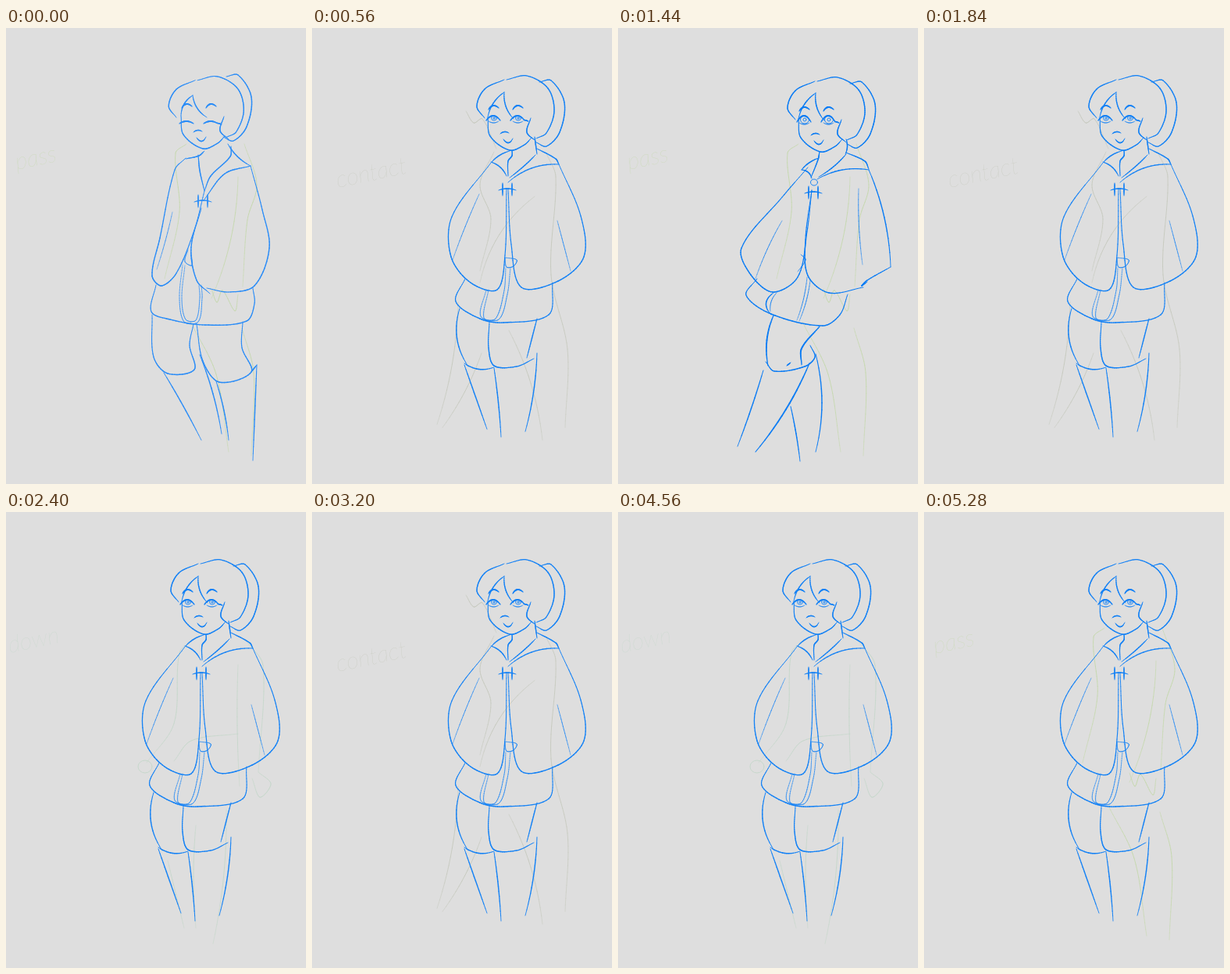
An HTML page with a canvas for the animation above (5.36 s loop, 384 by 582 pixels).

```html
<!DOCTYPE html>
<html lang="en">
<head>
<meta charset="utf-8">
<title>Walk sketch</title>
<style>
html, body { margin: 0; width: 100%; height: 100%; overflow: hidden; background: #dedede; }
canvas { display: block; width: 384px; height: 582px; }
</style>
</head>
<body>
<canvas id="stage"></canvas>
<script>
const W = 384, H = 582, STEP = 80, STEPS = 67;
const canvas = document.getElementById("stage");
const dpr = window.devicePixelRatio || 1;
canvas.width = W * dpr;
canvas.height = H * dpr;
const g = canvas.getContext("2d");
g.scale(dpr, dpr);
g.lineCap = "round";

let weight = 1.4;
const mix = (a, b, t) => a + (b - a) * t;

// A pen stroke along at(t), thinner towards both ends
function stroke(at, pieces) {
  let [x, y] = at(0);
  for (let i = 1; i <= pieces; i++) {
    const t = i / pieces;
    g.lineWidth = weight * (0.6 + 0.4 * Math.sin(Math.PI * t));
    g.beginPath();
    g.moveTo(x, y);
    [x, y] = at(t);
    g.lineTo(x, y);
    g.stroke();
  }
}

// Arc from one point to another; a positive bulge goes up for rightward strokes
function bow(x1, y1, x2, y2, bulge = 0) {
  const dx = x2 - x1, dy = y2 - y1, len = Math.hypot(dx, dy);
  stroke(t => {
    const b = 4 * t * (1 - t) * bulge / len;
    return [x1 + dx * t + dy * b, y1 + dy * t - dx * b];
  }, 14);
}

// Smooth curve through x,y pairs, with tangents weighted by chord length
function curve(...xy) {
  const n = xy.length / 2 - 1;
  const p = i => { i = Math.min(n, Math.max(0, i)); return [xy[2 * i], xy[2 * i + 1]]; };
  const gap = (a, b) => Math.hypot(b[0] - a[0], b[1] - a[1]);
  const slope = (i, k) => {
    const a = p(i - 1), b = p(i), c = p(i + 1);
    return (c[k] - a[k]) / (gap(a, b) + gap(b, c));
  };
  stroke(t => {
    const i = Math.min(n - 1, Math.floor(t * n)), u = t * n - i, v = 1 - u;
    const a = p(i), b = p(i + 1), d = gap(a, b);
    return [0, 1].map(k =>
      a[k] * v * v * (1 + 2 * u) + b[k] * u * u * (1 + 2 * v) +
      d * u * v * (slope(i, k) * v - slope(i + 1, k) * u));
  }, n * 12);
}

function ring(x, y, rx, ry) {
  g.lineWidth = 0.9;
  g.beginPath();
  g.ellipse(x, y, rx, ry, 0, 0, 2 * Math.PI);
  g.stroke();
}

function place(x, y, size, part) {
  g.save();
  g.translate(x, y);
  g.scale(size, size);
  part();
  g.restore();
}

function inked(w, part) {
  const before = weight;
  weight = w;
  part();
  weight = before;
}

// Head parts are measured from the chin
function hair() {
  curve(-7, -90, -32, -78, -42, -56, -32, -41);
  curve(-4, -90, 22, -95, 49, -79, 57, -50, 47, -22, 34, -15);
}
function tail() {
  curve(38, -87, 53, -89, 70, -61, 64, -23, 47, -5, 34, -10);
}
function face(tipX, tipY, open) {
  curve(-28, -42, -25, -18, 0, 0, 19, -7, 28, -16);
  bow(tipX, tipY, -28, -42, -4);
  bow(tipX, tipY, 5, -40, -4);
  curve(27, -41, 22, -23, 33, -12);
  const eyeY = open ? -38 : -32;
  for (const x of [-21, 10]) {
    inked(2, () => {
      bow(x - 9, eyeY, x + 9, eyeY, open + 3);
      bow(x - 6, -52, x + 7, -54, 4);
    });
    if (open) {
      ring(x + 1, -41, open + 0.5, open);
      ring(x + 1, -41, open / 2.5, open / 2.5);
      inked(0.8, () => bow(x - 6, -37, x + 7, -37, -2));
    }
  }
  bow(24, eyeY + 1, 18, eyeY - 1);
  bow(-12, -21, -1, -22, 2);
  bow(-8, -14, 4, -15, -5);
}

function clasp(x, y) {
  bow(x - 11, y + 1, x + 11, y + 1, 2);
  for (const side of [-6, 6]) bow(x + side, y - 8, x + side, y + 8);
}

function shy() {
  place(249, 154, 0.97, hair);
  place(244, 149, 1, tail);
  place(252, 154, 1, () => face(-13, -68, 0));
  // coat
  curve(230, 167, 247, 163, 254, 157);
  curve(246, 162, 248, 182, 254, 208);
  bow(284, 148, 313, 176, -3);
  curve(288, 151, 287, 164, 262, 189, 254, 208);
  curve(313, 176, 280, 186, 253, 220);
  clasp(252, 221);
  curve(230, 166, 216, 181, 197, 268, 187, 316, 199, 329, 218, 313, 241, 258, 254, 208);
  curve(313, 176, 328, 232, 337, 281, 318, 329, 285, 337, 257, 332);
  curve(250, 230, 237, 280, 244, 322, 261, 339);
  // shorts
  curve(192, 328, 186, 362, 210, 372, 255, 379, 308, 374, 318, 352, 316, 332);
  inked(0.8, () => {
    bow(213, 235, 193, 308, 1);
    curve(233, 283, 229, 298, 238, 303, 237, 288);
    curve(226, 302, 222, 345, 228, 375, 246, 375, 251, 345, 250, 328);
    curve(229, 303, 225, 345, 230, 372, 243, 373, 248, 345, 247, 328);
  });
  // legs
  curve(187, 366, 189, 420, 207, 441, 241, 436, 235, 405, 240, 378);
  curve(244, 378, 252, 425, 273, 452, 314, 439, 302, 408, 303, 375);
  bow(202, 440, 250, 526, 1);
  bow(248, 417, 276, 518, 3);
  bow(269, 451, 285, 526, 2);
  bow(314, 439, 321, 430);
  bow(321, 430, 316, 552);
}

function wide() {
  place(259, 158, 1, () => { hair(); tail(); face(-6, -75, 5); });
  // cape
  curve(258, 158, 256, 168, 247, 191);
  bow(235, 181, 257, 166, 2);
  bow(235, 181, 248, 192, 3);
  bow(292, 142, 291, 161, 2);
  curve(292, 159, 316, 170, 321, 180);
  bow(321, 181, 255, 193, -6);
  bow(292, 161, 257, 190, 2);
  ring(251, 197, 4.5, 4);
  clasp(250, 210);
  curve(243, 178, 210, 216, 158, 281, 170, 315, 198, 337, 230, 318, 242, 260, 248, 207);
  bow(321, 181, 349, 305, 6);
  curve(349, 305, 319, 322, 312, 329, 319, 324);
  curve(314, 331, 270, 338, 243, 316, 240, 270, 248, 207);
  // shorts
  curve(178, 320, 164, 341, 196, 365, 262, 380, 284, 366, 294, 340);
  bow(199, 338, 196, 366, -8);
  inked(0.8, () => {
    bow(210, 246, 176, 320, -2);
    bow(308, 205, 313, 302, -2);
    bow(203, 338, 195, 362, -3);
    bow(242, 318, 229, 373, 2);
    bow(246, 322, 232, 374, 2);
    curve(234, 289, 240, 296, 230, 311);
  });
  // legs
  bow(186, 437, 153, 534, 1);
  bow(221, 483, 233, 553, 1);
  bow(253, 416, 253, 541, 8);
  curve(189, 426, 200, 438, 239, 432, 252, 420, 246, 405);
  bow(216, 431, 221, 427);
  inked(1.9, () => {
    bow(199, 367, 192, 431, -5);
    curve(258, 381, 235, 409, 235, 430);
    bow(245, 428, 176, 541, 5);
  });
}

function calm() {
  place(253, 156, 1, () => { hair(); tail(); face(-7, -74, 3); });
  // coat
  curve(256, 156, 256, 163, 251, 170, 251, 189);
  bow(230, 171, 253, 157, 2);
  bow(229, 171, 249, 189, 3);
  bow(285, 139, 288, 161);
  curve(288, 154, 312, 167, 316, 174);
  bow(316, 174, 251, 197, -7);
  bow(286, 162, 253, 191, 1);
  clasp(250, 206);
  curve(229, 172, 179, 241, 178, 292, 203, 325, 237, 334, 247, 290, 249, 205);
  curve(316, 174, 344, 240, 348, 292, 315, 323, 268, 331, 255, 276, 251, 205);
  // shorts
  curve(196, 320, 184, 349, 215, 371, 245, 376, 303, 366, 308, 325);
  inked(0.8, () => {
    bow(214, 212, 180, 296, -1);
    bow(314, 246, 331, 310);
    curve(247, 293, 262, 296, 258, 304, 249, 305, 247, 293);
    curve(223, 334, 216, 368, 239, 372, 250, 340, 254, 306);
    curve(226, 334, 220, 370, 235, 371, 246, 335, 248, 306);
  });
  // legs
  bow(189, 358, 200, 432, -9);
  bow(195, 428, 233, 433, -5);
  curve(227, 376, 226, 408, 233, 431, 262, 432, 284, 422);
  bow(288, 371, 275, 421);
  bow(195, 430, 224, 512);
  bow(233, 434, 242, 522, 1);
  bow(288, 415, 273, 515, 3);
}

// Faint construction layer
function word(text, x, y) {
  g.save();
  g.translate(x, y);
  g.rotate(-0.21);
  g.font = "italic 100 30px Lato, 'Open Sans', sans-serif";
  g.fillText(text, 0, 0);
  g.restore();
}
function passing() {
  word("pass", 14, 181);
  curve(231, 148, 217, 160, 222, 235, 203, 320);
  curve(305, 148, 321, 200, 309, 245, 303, 330);
  bow(297, 190, 263, 345, 8);
  curve(263, 333, 270, 350, 277, 335, 293, 361, 297, 340);
  curve(236, 375, 269, 442, 285, 541);
  curve(302, 383, 317, 440, 314, 546);
}
function lowering() {
  word("down", 5, 180);
  curve(239, 163, 222, 180, 215, 270, 180, 320);
  curve(308, 165, 329, 196, 323, 332);
  ring(178, 325, 9, 8);
  curve(323, 332, 339, 347, 325, 364, 315, 340);
  bow(297, 195, 299, 350, -2);
  curve(215, 318, 237, 292, 297, 283);
  bow(207, 445, 228, 531);
  bow(282, 380, 265, 551, 5);
  bow(243, 400, 243, 531, -3);
}
function touching() {
  word("contact", 33, 204);
  curve(197, 106, 207, 121, 218, 116, 236, 154);
  curve(233, 158, 215, 200, 229, 244, 215, 310);
  curve(300, 160, 312, 190, 306, 315, 327, 410, 324, 510);
  bow(285, 215, 215, 325, -12);
  bow(187, 350, 160, 506, 6);
  bow(217, 415, 167, 510, 4);
  bow(252, 386, 295, 526, 7);
}

const poses = { A: ["#2a8cf7", shy], B: ["#0b7cf4", wide], C: ["#1582f5", calm] };
const roughs = { P: ["#c5d8ad", passing], D: ["#c5d7ca", lowering], K: ["#c6c9be", touching] };

// Drawings in order, each held for an equal share of the loop
const pick = (order, step) => order[Math.floor(step * order.length / STEPS)];

function draw([color, part], w) {
  g.strokeStyle = g.fillStyle = color;
  inked(w, part);
}

let last = -1;
function tick(now) {
  const step = Math.floor(now / STEP) % STEPS;
  if (step !== last) {
    last = step;
    g.fillStyle = "#dedede";
    g.fillRect(0, 0, W, H);
    draw(roughs[pick("PKDPPKDPKPDPDDP", step)], 0.9);
    draw(poses[pick("ACBABCCBCBABCBC", step)], 1.45);
  }
  requestAnimationFrame(tick);
}
tick(0);
</script>
</body>
</html>
```
